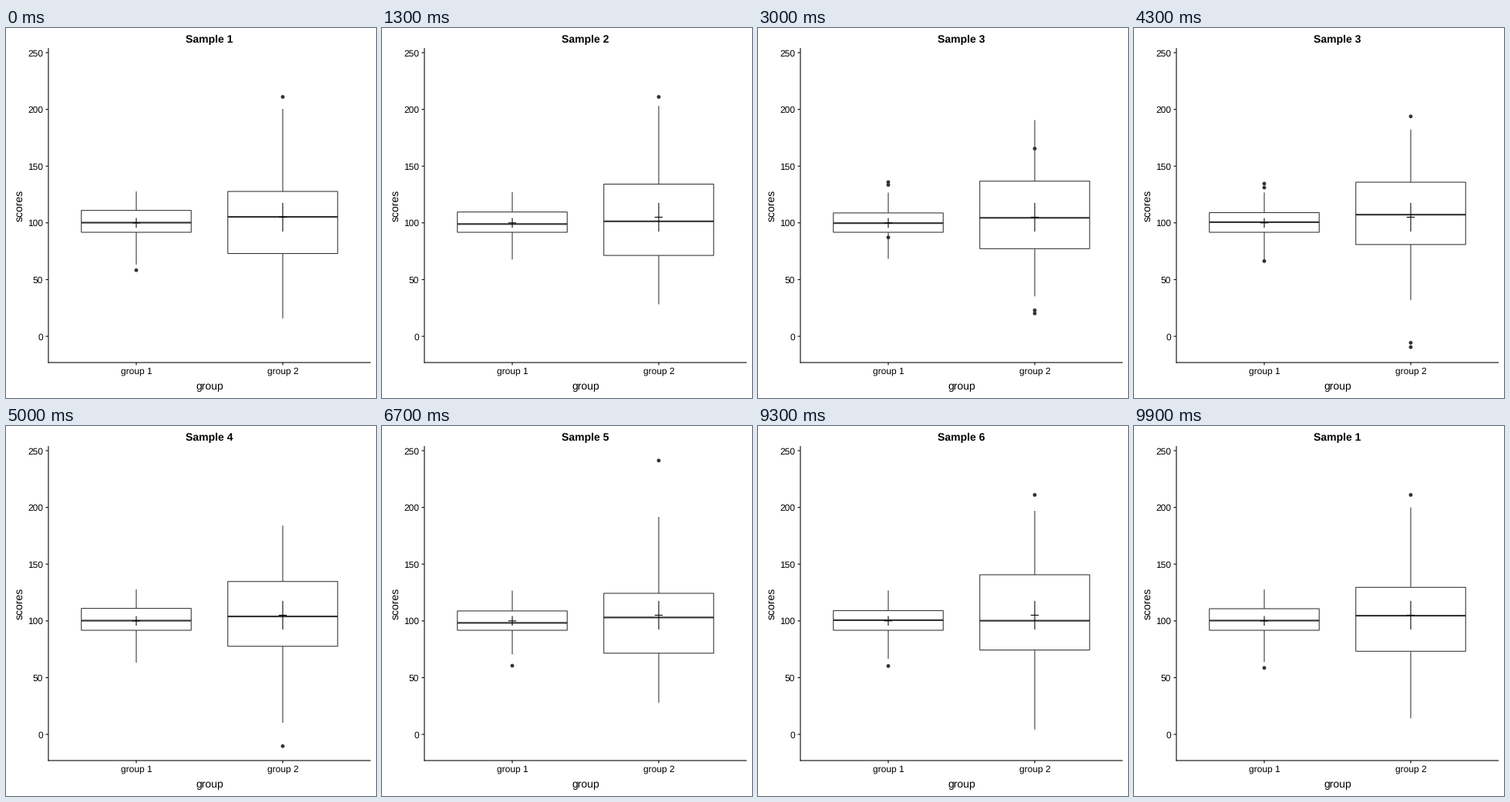
Animation of 480x480 px, one loop 10 s. Source, as a matplotlib script:

```python
import numpy as np
import matplotlib.pyplot as plt
from matplotlib.animation import FuncAnimation
from matplotlib.patches import Circle, Rectangle

plt.rcParams["font.family"] = "Liberation Sans"
plt.rcParams["text.hinting"] = "none"
plt.rcParams["path.snap"] = False

SIZE, DPI = 480, 72  # at 72 dpi one point is one pixel
SAMPLES, FRAMES = 6, 100
STEPS, PERIOD, FIRST = 8, 17, 8  # transition length, full cycle, first start
GREY = "#333333"
LEFT, RIGHT, TOP, BOTTOM = 55, 473, 26, 434
UNIT = (RIGHT - LEFT) / 2.2  # two categories with 0.6 of padding each side
HALF = 0.375 * UNIT
CENTERS = [LEFT + (0.6 + i) * UNIT for i in range(2)]
MEANS = [(100, 4.26), (105, 12.6)]  # mean and confidence margin

# Wide group: upper whisker, q3, median, q1, lower whisker of each sample
WIDE = [(200.4, 127.7, 105.3, 73, 15.8), (204.8, 138, 99, 70.3, 35.7),
        (182, 136, 107.7, 81.4, 35), (184, 134.7, 103.9, 77.6, 10.2),
        (191.6, 124.3, 103, 71.5, 27.9), (196.5, 142.5, 99.4, 74.5, 2.6)]
OUTLIERS = [([58.3], [211]), ([132.5], []), ([134, 138, 60], [223, -5, -9.4]),
            ([], [-10.4]), ([60.5], [241.3]), ([60.5], [])]


def narrow(i):
    """The narrow group wavers around fixed levels, repeating every 3 samples."""
    c, s = np.cos(2 * np.pi * i / 3), np.sin(2 * np.pi * i / 3)
    return (127 + 0.7 * c, 109.5 + 1.5 * c, 99.7 + 0.5 * c - 1.4 * s,
            91.7, 66.9 - 3.7 * c + 1.9 * s)


def ypix(score):
    return 400 - 1.472 * np.asarray(score, float)


fig = plt.figure(figsize=(SIZE / DPI, SIZE / DPI), dpi=DPI, facecolor="white")
ax = fig.add_axes([0, 0, 1, 1])
ax.set(xlim=(0, SIZE), ylim=(SIZE, 0))
ax.axis("off")


def line(x, y, color="black", lw=1.07, z=1):
    return ax.plot(x, y, color=color, lw=lw, zorder=z,
                   solid_capstyle="butt", snap=False)[0]


def label(x, y, text, size, **kw):
    return ax.text(x, y, text, fontsize=size, color="black",
                   va="baseline", **{"ha": "center", **kw})


class Box:
    def __init__(self, x, mean, margin):
        self.dots = [ax.add_patch(Circle((x, 0), 2.42, color=GREY, lw=0, zorder=2))
                     for _ in range(3)]
        self.whiskers = [line([x, x], [0, 0], GREY, z=3) for _ in range(2)]
        self.box = ax.add_patch(Rectangle((x - HALF, 0), 2 * HALF, 0, fc="white",
                                          ec=GREY, lw=1.07, zorder=4))
        self.median = line([x - HALF, x + HALF], [0, 0], GREY, 2.13, 5)
        line([x, x], ypix([mean - margin, mean + margin]), z=6)
        line([x - 5.2, x + 5.2], ypix([mean, mean]), z=6)

    def update(self, stats, outliers):
        top, q3, med, q1, low = ypix(stats)
        self.whiskers[0].set_ydata([top, q3])
        self.whiskers[1].set_ydata([q1, low])
        self.box.set_y(q3)
        self.box.set_height(q1 - q3)
        self.median.set_ydata([med, med])
        for i, dot in enumerate(self.dots):
            dot.set_visible(i < len(outliers))
            if i < len(outliers):
                dot.center = dot.center[0], float(ypix(outliers[i]))


def mix(a, b, t):
    return (1 - t) * np.array(a, float) + t * np.array(b, float)


def mix_outliers(a, b, t):
    """Blend lists of unequal length, padding the shorter one with a mean."""
    if t in (0, 1) or not (a or b):
        return b if t == 1 else a
    n = max(len(a), len(b))
    pad_a, pad_b = np.mean(a or b), np.mean(b or a)
    return mix(a + [pad_a] * (n - len(a)), b + [pad_b] * (n - len(b)), t)


# Axes, ticks and labels
line([LEFT, LEFT], [TOP, BOTTOM + 0.5])
line([LEFT - 0.5, RIGHT], [BOTTOM, BOTTOM])
for score in range(0, 251, 50):
    y = float(ypix(score))
    line([LEFT - 3.5, LEFT], [y, y])
    label(48.2, y + 4.4, str(score), 12, ha="right")
for i, x in enumerate(CENTERS, 1):
    line([x, x], [BOTTOM, BOTTOM + 3.5])
    label(x, 448.4, f"group {i}", 12)
label(264, 469, "group", 14)
label(21, 230.3, "scores", 14, rotation=90, rotation_mode="anchor")
title = label(263.8, 19, "", 14, weight="bold")
boxes = [Box(x, *m) for x, m in zip(CENTERS, MEANS)]


def draw(frame):
    leg = min(max((frame - FIRST) // PERIOD, 0), SAMPLES - 1)
    start = FIRST + PERIOD * leg
    if frame >= FRAMES - STEPS:  # the last hold is cut short to close the loop
        leg, start = SAMPLES - 1, FRAMES - STEPS
    t = min(max((frame - start) / STEPS, 0), 1)
    nxt = (leg + 1) % SAMPLES
    stats = (narrow(leg), narrow(nxt)), (WIDE[leg], WIDE[nxt])
    for box, pair, dots in zip(boxes, stats, zip(OUTLIERS[leg], OUTLIERS[nxt])):
        box.update(mix(*pair, t), mix_outliers(*dots, t))
    title.set_text(f"Sample {(nxt if t >= 0.5 else leg) + 1}")
    return []


anim = FuncAnimation(fig, draw, frames=FRAMES, interval=100,
                     repeat=True, repeat_delay=0, blit=False)
plt.show()
```
